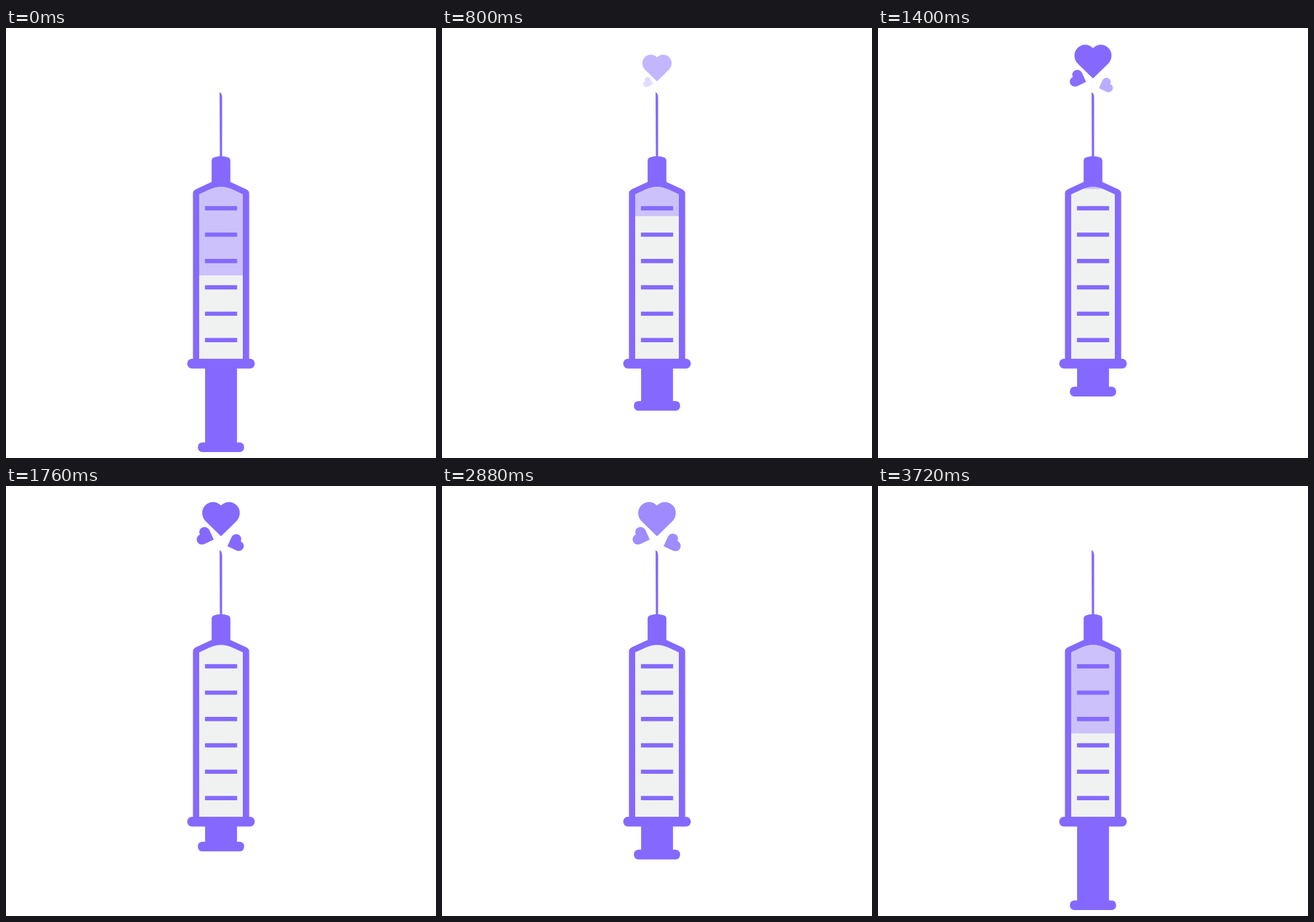
Write an HTML page with a canvas that moves like this. It is 650 px wide and 650 px high and loops after 3.84 s.

```html
<!DOCTYPE html>
<html lang="en">
<head>
<meta charset="utf-8">
<title>Syringe</title>
<style>
  html, body { margin: 0; width: 100%; height: 100%; overflow: hidden; background: #fff; }
  canvas { display: block; width: 650px; height: 650px; }
</style>
</head>
<body>
<canvas id="stage" width="650" height="650"></canvas>
<script>
const ctx = document.getElementById('stage').getContext('2d');
const LOOP = 3840, STEP = 40;
const PURPLE = '#8569ff', LIQUID = '#cdc1fc', GLASS = '#f0f2f2';

const clamp = v => Math.max(0, Math.min(1, v));
const span = (t, a, b) => clamp((t - a) / (b - a));
const mix = (a, b, p) => a + (b - a) * p;

// Ease with flat ends; a and b are the x values of the two handles.
function ease(x, a, b) {
  if (x <= 0 || x >= 1) return clamp(x);
  let lo = 0, hi = 1, s = 0.5;
  for (let i = 0; i < 24; i++) {
    s = (lo + hi) / 2;
    const q = 1 - s;
    if (3 * s * q * q * a + 3 * s * s * q * b + s * s * s < x) lo = s; else hi = s;
  }
  return s * s * (3 - 2 * s);
}

function box(x, y, w, h, r = 0) {
  ctx.beginPath();
  ctx.roundRect(x, y, w, h, r);
  ctx.fill();
}

// Each heart grows out of the needle tip; from and to place its point.
const hearts = [
  { from: [325, 97], to: [325, 76], size: 1, turn: 0, delay: 0 },
  { from: [325, 90], to: [314, 81], size: 0.48, turn: -70, delay: 200 },
  { from: [329, 91], to: [335, 91], size: 0.48, turn: 70, delay: 540 }
];

const heartPath = new Path2D(
  'M0 0L-23.5 -23C-30 -30 -30 -41 -23.5 -47C-17 -53.5 -7 -53.5 0 -46.5' +
  'C7 -53.5 17 -53.5 23.5 -47C30 -41 30 -30 23.5 -23Z');
const outerPath = new Path2D(
  'M282.6 505V250Q282.6 246 287 243.8L310.8 232.8V201Q310.8 197 314 195.7Q325 191.7 336 195.7' +
  'Q339.2 197 339.2 201V232.8L363 243.8Q367.6 246 367.6 250V505Z');
const innerPath = new Path2D(
  'M292 500V251.5L306 245Q325 235.5 344 245L358 251.5V500Z');
const needlePath = new Path2D('M322.8 97Q326.7 99 326.7 105V197H323.3Z');

function drawHeart(h, t) {
  const p = ease(span(t - h.delay, 160, 1680), 0.32, 0.05);
  const shown = span(t - h.delay, 400, 1220) * (1 - span(t, 2760, 3300));
  if (p <= 0 || shown <= 0) return;
  ctx.save();
  ctx.globalAlpha = shown;
  ctx.translate(mix(h.from[0], h.to[0], p), mix(h.from[1], h.to[1], p));
  ctx.rotate(h.turn * Math.PI / 180);
  ctx.scale(h.size * p, h.size * p);
  ctx.fill(heartPath);
  ctx.restore();
}

function drawLiquid(t) {
  const refill = t >= 2720;
  const rise = refill ? 0 : 142 * ease(span(t, 120, 2120), 0.22, 0.165);
  ctx.save();
  ctx.clip(innerPath);
  ctx.globalAlpha = refill ? span(t, 2920, 3720) : 1;
  ctx.fillStyle = LIQUID;
  ctx.fillRect(292, 230, 66, Math.max(0, 374 - rise - 230));
  ctx.restore();
}

function drawPlunger(t) {
  const push = ease(span(t, 120, 2120), 0.2, 0.08);
  const pull = ease(span(t, 2680, 3720), 0.206, 0.678);
  const bottom = 641 - 90 * (push - pull);
  box(301, 505, 48.2, bottom - 512);
  box(290.1, bottom - 14.6, 69.8, 14.6, 6.5);
}

function draw(t) {
  ctx.fillStyle = '#fff';
  ctx.fillRect(0, 0, 650, 650);
  ctx.fillStyle = PURPLE;
  drawPlunger(t);
  ctx.fill(needlePath);
  ctx.fill(outerPath);
  box(274, 500, 102, 14.7, 7);
  ctx.fillStyle = GLASS;
  ctx.fill(innerPath);
  drawLiquid(t);
  ctx.fillStyle = PURPLE;
  for (let i = 0; i < 6; i++) box(300.8, 269.3 + i * 39.85, 48.6, 6.4);
  for (const h of hearts) drawHeart(h, t);
}

const start = performance.now();
function tick() {
  const t = (performance.now() - start) % LOOP;
  draw(Math.floor(t / STEP) * STEP);
  requestAnimationFrame(tick);
}
tick();
</script>
</body>
</html>
```
